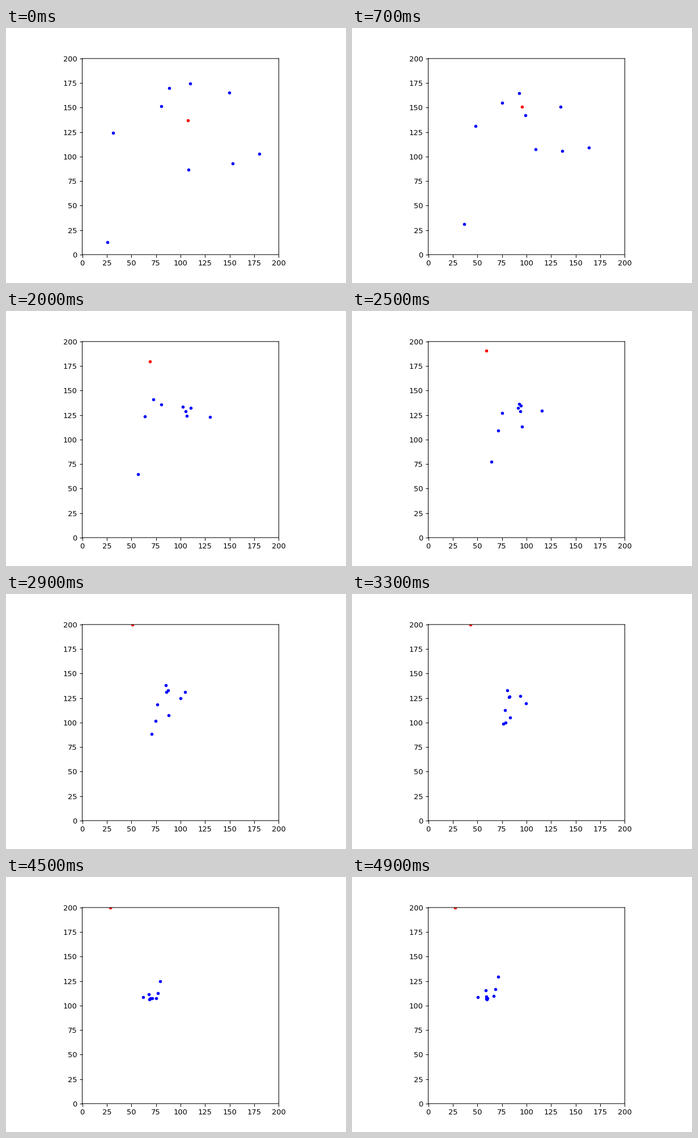
Recreate the animation shown at these times as a matplotlib script. Size 600 by 450 pixels, loop 5 s.

```python
import numpy as np
import matplotlib.pyplot as plt
from matplotlib.animation import FuncAnimation

WIDTH, HEIGHT, DPI = 600, 450, 93.75
FRAMES, INTERVAL = 50, 100
LIMIT = 200
LEFT, RIGHT, TOP, BOTTOM = 134.5, 481.4, 53.9, 399.9  # plot box, stage pixels

# Each member cruises straight, bends towards the flock, then swings through
# its centre. Columns: start, end of the cruise, arrival.
CRUISE, ARRIVE, END = 14, 25, 49
START, BEND, JOIN = np.array([
    [(189, 184), (247, 160), (297, 176)],
    [(274, 137), (338, 169), (298, 166)],
    [(288, 105), (242, 158), (258, 210)],
    [(325, 97), (265, 132), (265, 179)],
    [(394, 113), (342, 163), (300, 203)],
    [(447, 221), (388, 199), (335, 175)],
    [(400, 238), (342, 194), (295, 163)],
    [(322, 249), (326, 178), (293, 170)],
    [(179, 377), (217, 314), (246, 265)],
], dtype=float).transpose(1, 0, 2)

CRUISE_SPEED = (BEND - START) / CRUISE
JOIN_SPEED = (JOIN - BEND) / (ARRIVE - CRUISE)
END_SPEED = np.array([-5, -1.5])
END_CENTRE = np.array([241, 205])
SWING = -0.4
FINISH = END_CENTRE + SWING * (JOIN - JOIN.mean(axis=0))

LEADER_START = np.array([321, 162])
LEADER_SPEED = np.array([-3.5, -3.87])


def hermite(t, t0, t1, p0, p1, v0, v1):
    span = t1 - t0
    u = (t - t0) / span
    return ((1 + 2 * u) * (1 - u) ** 2 * p0 + u * (1 - u) ** 2 * span * v0
            + u * u * (3 - 2 * u) * p1 + u * u * (u - 1) * span * v1)


def flock_at(t):
    if t <= CRUISE:
        return START + CRUISE_SPEED * t
    if t <= ARRIVE:
        return hermite(t, CRUISE, ARRIVE, BEND, JOIN, CRUISE_SPEED, JOIN_SPEED)
    return hermite(t, ARRIVE, END, JOIN, FINISH, JOIN_SPEED, END_SPEED)


def leader_at(t):
    """Straight flight after a soft start, held at the top wall, slow near the left."""
    x, y = LEADER_START + LEADER_SPEED * (t - 1 + np.exp(-t))
    return np.array([(max(x, 186 - 0.45 * (t - 40)), y)])


def to_units(points):
    x, y = points.T
    return np.column_stack([
        LIMIT * (x - LEFT) / (RIGHT - LEFT),
        np.minimum(LIMIT * (BOTTOM - y - 0.7) / (BOTTOM - TOP), LIMIT)])


fig = plt.figure(figsize=(WIDTH / DPI, HEIGHT / DPI), dpi=DPI)
ax = fig.add_axes([LEFT / WIDTH, 1 - BOTTOM / HEIGHT,
                   (RIGHT - LEFT) / WIDTH, (BOTTOM - TOP) / HEIGHT])
ax.set(xlim=(0, LIMIT), ylim=(0, LIMIT),
       xticks=range(0, LIMIT + 1, 25), yticks=range(0, LIMIT + 1, 25))
for spine in ax.spines.values():
    spine.set_snap(False)

flock_dots = ax.scatter([], [], s=9, c="blue", linewidths=1.25)
leader_dot = ax.scatter([], [], s=9, c="red", linewidths=1.25)


def update(frame):
    flock_dots.set_offsets(to_units(flock_at(frame)))
    leader_dot.set_offsets(to_units(leader_at(frame)))
    return flock_dots, leader_dot


anim = FuncAnimation(fig, update, frames=FRAMES, interval=INTERVAL, repeat=True)
plt.show()
```
